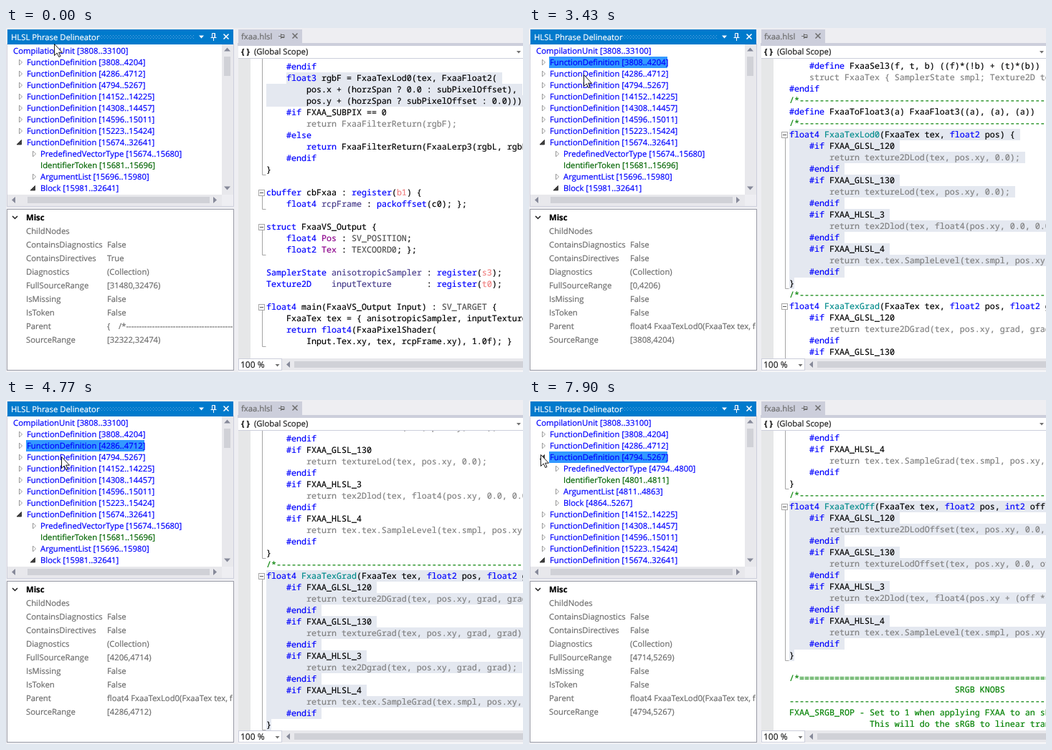
An HTML page for the animation above (8 s loop, 721x481 px).

```html
<!DOCTYPE html>
<html lang="en">
<head>
<meta charset="utf-8">
<title>Syntax tree browser</title>
<style>
html, body { margin: 0; width: 100%; height: 100%; overflow: hidden; background: #eeeef2; }
svg { display: block; }
text {
  white-space: pre; text-rendering: geometricPrecision;
  font: 11.3px "Open Sans", "Noto Sans", sans-serif;
  fill: currentColor; stroke: currentColor; stroke-width: .2px;
}
.code { font: 11.667px "Noto Sans Mono", "DejaVu Sans Mono", monospace; }
.bold { font-weight: 700; }
.zoom { font-size: 12px; }
</style>
</head>
<body>
<svg id="stage" width="721" height="481" viewBox="0 0 721 481">
  <defs>
    <clipPath id="codeClip"><rect x="341" y="43" width="380" height="419"/></clipPath>
    <clipPath id="propClip"><rect x="3" y="255" width="313" height="223"/></clipPath>
    <pattern id="grip" x="129" y="10" width="4" height="4" patternUnits="userSpaceOnUse">
      <path d="M0 0h1v1h-1zM2 2h1v1h-1z" fill="#59a8de"/>
    </pattern>
  </defs>
</svg>
<script>
const stage = document.getElementById('stage');

function add(parent, tag, attrs = {}, text) {
  const el = document.createElementNS('http://www.w3.org/2000/svg', tag);
  for (const k in attrs) el.setAttribute(k, attrs[k]);
  if (text !== undefined) el.textContent = text;
  return parent.appendChild(el);
}
const box = (p, x, y, width, height, fill, stroke = 'none') =>
  add(p, 'rect', { x, y, width, height, fill, stroke });
const shape = (p, d, fill, stroke = 'none', w = 1) =>
  add(p, 'path', { d, fill, stroke, 'stroke-width': w });
const label = (p, x, y, s, color, cls = '') =>
  add(p, 'text', { x, y, color, class: cls }, s);

const GREY = '#6d6d6d', EDGE = '#cccedb', TRACK = '#e8e8ec', THUMB = '#d0d1d7', ARROW = '#868999';

// ---- fixed window parts ----
function drawFrame() {
  box(stage, 0, 0, 721, 481, '#eeeef2');

  box(stage, 1.5, 22.5, 316, 227, '#fff', EDGE);
  box(stage, 2, 2, 315, 21, '#007acc');
  label(stage, 7, 16.5, 'HLSL Phrase Delineator', '#fff');
  box(stage, 129, 10, 134, 5, 'url(#grip)');
  shape(stage, 'M269 10.5h7l-3.5 4z', '#fff');
  shape(stage, 'M287.5 13V7.5h4V13M291 7.5V13M285.5 13.5h8M289.5 13.5V18', 'none', '#fff');
  shape(stage, 'M303.5 8.5l7 7M310.5 8.5l-7 7', 'none', '#fff', 1.6);

  box(stage, 301, 23, 16, 210, TRACK);
  shape(stage, 'M304 32.5h9l-4.5 -5z', ARROW);
  shape(stage, 'M304 221.5h9l-4.5 5z', ARROW);
  box(stage, 2, 233, 299, 16, TRACK);
  shape(stage, 'M13 236v9l-5 -4.5z', ARROW);
  shape(stage, 'M289 236v9l5 -4.5z', ARROW);
  box(stage, 30, 236, 254, 9, THUMB);
  box(stage, 301, 233, 16, 16, '#eeeef2');

  box(stage, 1.5, 253.5, 316, 225, '#fff', '#999ba6');
  shape(stage, 'M9 263l3.5 3.5l3.5 -3.5', 'none', '#1e1e1e', 1.5);
  label(stage, 28, 269, 'Misc', '#000', 'bold');

  box(stage, 324, 2, 89, 20, EDGE);
  box(stage, 323, 21, 398, 4, EDGE);
  label(stage, 328, 15.5, 'fxaa.hlsl', GREY);
  shape(stage, 'M380 11.5h3M383.5 8v7M384 9.5h4v4h-4M384 12.5h4', 'none', GREY);
  shape(stage, 'M399.5 7.5l7 7M406.5 7.5l-7 7', 'none', GREY, 1.5);

  box(stage, 324, 25, 397, 455, '#fff');
  box(stage, 324, 42, 397, 1, EDGE);
  label(stage, 328, 37, '{ }', '#1e1e1e', 'bold');
  label(stage, 346, 37, '(Global Scope)', '#1e1e1e');
  shape(stage, 'M712 32h6l-3 3.5z', '#717171');
  box(stage, 324, 43, 17, 419, '#e6e7e8');

  box(stage, 324, 462, 397, 17, TRACK);
  box(stage, 324.5, 462.5, 60, 16, '#fff', EDGE);
  label(stage, 327, 475, '100 %', '#1e1e1e', 'zoom');
  shape(stage, 'M375.5 470h6l-3 3.5z', '#717171');
  shape(stage, 'M396 466v9l-5 -4.5z', ARROW);
  box(stage, 402, 466, 319, 9, THUMB);
}

// ---- syntax tree ----
const NODES = ['3808..4204', '4286..4712', '4794..5267', '14152..14225',
  '14308..14457', '14596..15011', '15223..15424', '15674..32641'];
const parts = (ranges, blockOpen) =>
  ['PredefinedVectorType', 'IdentifierToken', 'ArgumentList', 'Block'].map((name, i) => ({
    s: `${name} [${ranges[i]}]`, depth: 1, leaf: i === 1, open: i === 3 && blockOpen
  }));

function drawTree(selected, expanded) {
  const g = add(stage, 'g');
  const rows = NODES.map((r, i) => ({ s: `FunctionDefinition [${r}]`, depth: 0, open: i === 7, picked: i === selected }));
  if (expanded) {
    rows[2].open = true;
    rows.splice(3, 0, ...parts(['4794..4800', '4801..4811', '4811..4863', '4864..5267'], false));
  } else {
    rows.push(...parts(['15674..15680', '15681..15696', '15696..15980', '15981..32641'], true));
  }
  label(g, 10, 36, 'CompilationUnit [3808..33100]', '#00f');
  rows.forEach((row, i) => {
    const y = 48 + 16 * i, x = 19 * row.depth;
    if (row.picked) box(g, 28, y - 8, 165, 16, '#39f');
    if (row.open) shape(g, `M${x + 21.5} ${y - 3.5}v6.5h-6.5z`, '#404040', '#262626', .8);
    else if (!row.leaf) shape(g, `M${x + 18.5} ${y - 4}l4 4l-4 4z`, '#fff', '#999');
    label(g, x + 29, y + 4, row.s, row.leaf ? '#006400' : '#00f');
  });
  box(g, 304, 40, 9, expanded ? 26 : 27, THUMB);
  return g;
}

// ---- property grid ----
const FIELDS = ['ChildNodes', 'ContainsDiagnostics', 'ContainsDirectives', 'Diagnostics',
  'FullSourceRange', 'IsMissing', 'IsToken', 'Parent', 'SourceRange'];

function drawProps(g, { full, range, directives, parent }) {
  const p = add(g, 'g', { 'clip-path': 'url(#propClip)' });
  const values = ['', 'False', directives, '(Collection)', full, 'False', 'False', parent, range];
  FIELDS.forEach((f, i) => {
    label(p, 28, 288 + 19 * i, f, GREY);
    label(p, 141, 288 + 19 * i, values[i], GREY);
  });
}

// ---- code: "|" inactive line, "*" comment line, "@x" before a word picks an ink ----
const INK = { t: '#008b8b', g: '#483d8b', p: '#8b008b', s: '#505050', c: '#f08080' };
const TOKEN = /@(\w)(\w+)|(#\w+|\b(?:float[234]?|int2|struct|return|cbuffer|register|packoffset|SamplerState|Texture2D)\b)/g;

function drawLine(g, y, line) {
  const t = label(g, 363, y, '', '#000', 'code');
  const run = (s, color) => s && add(t, 'tspan', { color }, s);
  if (line[0] === '|') return run(line.slice(1), '#808080');
  if (line[0] === '*') return run(line.slice(1), '#008000');
  let at = 0;
  for (const m of line.matchAll(TOKEN)) {
    run(line.slice(at, m.index), '#000');
    m[1] ? run(m[2], INK[m[1]]) : run(m[3], '#00f');
    at = m.index + m[0].length;
  }
  run(line.slice(at), '#000');
}

function drawCode(g, { top, code, from, to, col = 0, folds }) {
  const c = add(g, 'g', { 'clip-path': 'url(#codeClip)' });
  const mid = i => top + 16 * i;
  for (let i = from; i <= to; i++) {
    const len = code[i].replace(/@\w|^[|*]/g, '').length, start = i === from ? col : 0;
    const closing = code[i] === '}';
    box(c, 363 + 7 * start, mid(i) - 8, 7 * (len - start + (closing ? 0 : 1)), 16, '#e4e8f0');
  }
  for (const [a, b] of folds) {
    const y = mid(a);
    shape(c, `M357.5 ${y}V${mid(b) + 7.5}h5`, 'none', '#a5a5a5');
    box(c, 352.5, y - 3.5, 8, 8, '#fff', '#a5a5a5');
    shape(c, `M354 ${y + .5}h5`, 'none', '#555');
  }
  code.forEach((line, i) => drawLine(c, mid(i) + 4, line));
}

const RULE = '*/*' + '-'.repeat(56);
const LEVELS = ['GLSL_120', 'GLSL_130', 'HLSL_3', 'HLSL_4'];
const body = calls => calls.flatMap((call, i) =>
  [`    #if FXAA_${LEVELS[i]}`, `|        return ${call};`, '    #endif']);

const LOD = ['float4 @tFxaaTexLod0(FxaaTex tex, float2 pos) {', ...body([
  'texture2DLod(tex, pos.xy, 0.0)', 'textureLod(tex, pos.xy, 0.0)',
  'tex2Dlod(tex, float4(pos.xy, 0.0, 0.0))', 'tex.tex.SampleLevel(tex.smpl, pos.xy, 0.0)']), '}'];
const GRAD = ['float4 @tFxaaTexGrad(FxaaTex tex, float2 pos, float2 grad) {', ...body([
  'texture2DGrad(tex, pos.xy, grad, grad)', 'textureGrad(tex, pos.xy, grad, grad)',
  'tex2Dgrad(tex, pos.xy, grad, grad)', 'tex.tex.SampleGrad(tex.smpl, pos.xy, grad, grad)']), '}'];
const OFFSET = ['float4 @tFxaaTexOff(FxaaTex tex, float2 pos, int2 off) {', ...body([
  'texture2DLodOffset(tex, pos.xy, 0.0, off)', 'textureLodOffset(tex, pos.xy, 0.0, off)',
  'tex2Dlod(tex, float4(pos.xy + (off * rcpFrame), 0.0, 0.0))',
  'tex.tex.SampleLevel(tex.smpl, pos.xy, 0.0, off)']), '}'];

const MAIN = [
  '    #endif',
  '    float3 rgbF = FxaaTexLod0(tex, FxaaFloat2(',
  '        pos.x + (horzSpan ? 0.0 : subPixelOffset),',
  '        pos.y + (horzSpan ? subPixelOffset : 0.0)));',
  '    #if FXAA_SUBPIX == 0',
  '|        return FxaaFilterReturn(rgbF);',
  '    #else',
  '        return FxaaFilterReturn(FxaaLerp3(rgbL, rgbF));',
  '    #endif',
  '}', '',
  'cbuffer cbFxaa : register(@cb1) {',
  '    float4 @grcpFrame : packoffset(c0); };', '',
  'struct FxaaVS_Output {',
  '    float4 @pPos : @sSV_POSITION;',
  '    float2 @pTex : @sTEXCOORD0; };', '',
  'SamplerState @ganisotropicSampler : register(@cs3);',
  'Texture2D    @ginputTexture       : register(@ct0);', '',
  'float4 main(FxaaVS_Output Input) : @sSV_TARGET {',
  '    FxaaTex tex = { anisotropicSampler, inputTexture };',
  '    return float4(FxaaPixelShader(',
  '        Input.Tex.xy, tex, rcpFrame.xy), 1.0f); }'
];

const LOD_PARENT = 'float4 FxaaTexLod0(FxaaTex tex, float2 pos) {';
const SCENES = [
  { at: 0, node: -1, top: 54, code: MAIN, from: 1, to: 3, col: 4,
    folds: [[-3, 9], [11, 12], [14, 16], [21, 24]],
    full: '[31480,32476)', range: '[32322,32474)', directives: 'True', parent: '{    /*' + '-'.repeat(50) },
  { at: 2280, node: 0, top: 53, from: 6, to: 19, folds: [[6, 19], [21, 34]],
    code: ['    #define FxaaSel3(f, t, b) ((f)*(!b) + (t)*(b))',
      '|    struct FxaaTex { SamplerState smpl; Texture2D tex; };', '#endif', RULE,
      '#define FxaaToFloat3(a) FxaaFloat3((a), (a), (a))', RULE, ...LOD, RULE, ...GRAD.slice(0, 5)],
    full: '[0,4206)', range: '[3808,4204)', directives: 'False', parent: LOD_PARENT },
  { at: 3920, node: 1, top: 38, from: 13, to: 26, folds: [[-3, 11], [13, 26]],
    code: [...LOD.slice(2), RULE, ...GRAD],
    full: '[4206,4714)', range: '[4286,4712)', directives: 'False', parent: LOD_PARENT },
  { at: 5770, node: 2, top: 53, from: 6, to: 19, folds: [[-3, 4], [6, 19]],
    code: [...GRAD.slice(9), RULE, ...OFFSET, '', '*/*' + '='.repeat(56),
      '*' + ' '.repeat(33) + 'SRGB KNOBS', '*' + '-'.repeat(58),
      '*FXAA_SRGB_ROP - Set to 1 when applying FXAA to an sRGB',
      '*' + ' '.repeat(16) + 'This will do the sRGB to linear transform'],
    full: '[4714,5269)', range: '[4794,5267)', directives: 'False', parent: LOD_PARENT }
];

drawFrame();
for (const s of SCENES) {
  s.g = add(stage, 'g');
  drawCode(s.g, s);
  drawProps(s.g, s);
}
const trees = SCENES.map(s => ({ at: s.at, g: drawTree(s.node, false) }));
trees.push({ at: 7900, g: drawTree(2, true) });

const pointer = shape(stage, 'M.5 .5V16.5L4.2 13L6.8 18.5L9 17.5L6.6 12.2H11.5Z', '#fff', '#000', .9);

// ---- pointer: start, end, steps, x, y reached, downward arc ----
const MOVES = [
  [180, 720, 10, 76, 46], [2840, 3610, 12, 76, 68], [3670, 3670, 1, 77, 68],
  [3920, 4100, 4, 77, 65], [4470, 4770, 6, 77, 79], [6270, 7050, 14, 16, 94, 8],
  [7110, 7110, 1, 16, 95], [7290, 7590, 6, 16, 76]
];
const ease = u => u * u * (3 - 2 * u);

function pointerAt(t) {
  let x = 67, y = 22;
  for (const [t0, t1, n, tx, ty, arc = 0] of MOVES) {
    if (t < t0) break;
    const k = t >= t1 ? n : 1 + Math.floor((t - t0) / (t1 - t0) * (n - 1));
    const e = ease(k / n);
    x += (tx - x) * e;
    y += (ty - y) * e + arc * Math.sin(Math.PI * e);
  }
  return [Math.round(x), Math.round(y)];
}

function showLatest(list, t) {
  const now = list.filter(s => s.at <= t).pop();
  for (const s of list) s.g.setAttribute('visibility', s === now ? 'visible' : 'hidden');
}

const LOOP = 8000, begin = performance.now();
function render() {
  const t = (performance.now() - begin) % LOOP;
  showLatest(SCENES, t);
  showLatest(trees, t);
  pointer.setAttribute('transform', `translate(${pointerAt(t)})`);
  requestAnimationFrame(render);
}
render();
</script>
</body>
</html>
```
